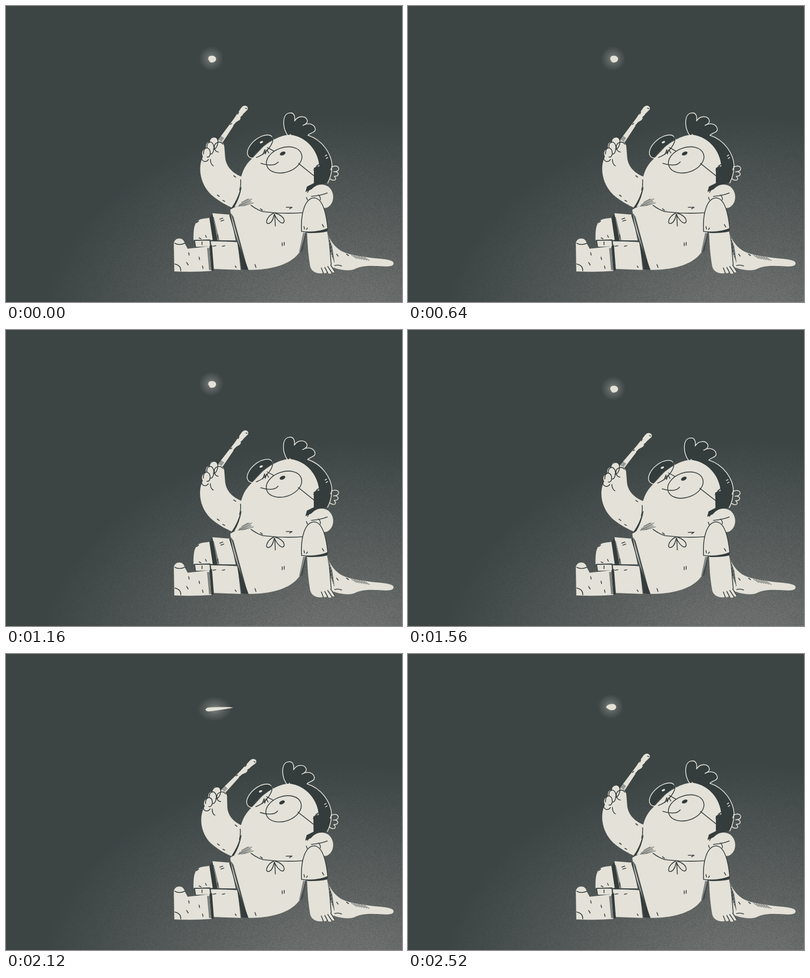
Write an HTML page with a canvas that moves like this. It is 800 by 600 pixels and loops after 2.56 s.

```html
<!DOCTYPE html>
<html lang="en">
<head>
<meta charset="utf-8">
<title>Night wand</title>
<style>
  html, body { margin: 0; width: 100%; height: 100%; overflow: hidden; background: #3c4444; }
  canvas, svg { position: absolute; left: 0; top: 0; width: 800px; height: 600px; }
  path, ellipse { stroke-linecap: round; stroke-linejoin: round; }
  .paper { fill: #e3e1d8; }
  .ink { fill: #343c3c; }
  .line { fill: none; stroke: #343c3c; stroke-width: 1.6; }
  .chalk { fill: none; stroke: #e3e1d8; stroke-width: 1.6; }
  .edged { fill: #e3e1d8; stroke: #343c3c; stroke-width: 1.6; }
  .hatch { fill: none; stroke: #343c3c; stroke-width: .9; }
</style>
</head>
<body>
<canvas id="ground" width="800" height="600"></canvas>
<svg viewBox="0 0 800 600">
  <defs>
    <radialGradient id="halo">
      <stop offset="0" stop-color="#e3e1d8" stop-opacity=".42"/>
      <stop offset=".45" stop-color="#e3e1d8" stop-opacity=".19"/>
      <stop offset="1" stop-color="#e3e1d8" stop-opacity="0"/>
    </radialGradient>
  </defs>

  <ellipse id="glow" rx="25" ry="25" fill="url(#halo)"/>
  <path id="spark" class="paper"/>

  <g id="cape">
    <path class="paper" d="M646 452C655 480 669 495 688 501C705 507 722 508 742 511C762 513 784 514 783 522C782 531 760 527 745 527C728 526 715 528 705 533C695 538 675 536 655 528Z"/>
    <path class="line" d="M664 526Q672 524 678 527M688 503L692 506M668 503L671 507"/>
  </g>

  <g id="arm">
    <g id="wand">
      <path class="paper" d="M428 272L460 229L474 208Q478 201 484 202Q490 204 488 210L479 219L472 231L464 236L438 276Z"/>
      <path class="line" d="M484 207L486 208M468 219L470 215M453 240L456 238M460 242L463 239M474 226L477 223"/>
    </g>
    <path class="paper" d="M398 305C388 324 390 358 414 382C430 396 444 403 457 409L477 385L476 346C460 340 446 328 443 309L441 284C439 275 431 271 427 272C425 262 411 263 411 275C403 277 404 283 404 289C397 290 394 299 398 305Z"/>
    <path class="line" d="M411 277C410 264 427 262 428 272C429 281 424 291 419 290M406 288C405 275 414 272 419 281C422 290 418 301 413 300M399 300C399 288 405 284 411 291C415 300 411 308 406 306M395 307C396 316 404 318 409 311M421 287C420 277 432 272 438 280M421 287Q422 295 429 296M413 311C413 318 416 323 419 324M460 344L464 347M427 383L431 386M438 394L442 396"/>
  </g>

  <g id="legs">
    <path class="paper" d="M379 475C378 446 382 433 399 431L414 429L420 476Z"/>
    <path class="edged" d="M381 475L412 474L413 488L383 489Z"/>
    <path class="ink" d="M411 430L417 421L431 476L418 477Z"/>
    <path class="paper" d="M417 420L453 423L464 475L427 475Z"/>
    <path class="paper" d="M340 538L339 481C341 468 359 468 361 481L367 492L411 487L416 537Q378 540 340 538Z"/>
    <path class="paper" d="M414 477L468 478L474 535L418 533Z"/>
    <path class="ink" d="M411 487L416 484L420 535L415 537Z"/>
    <path class="line" d="M381 475Q424 474 468 478M341 481Q350 486 361 481M341 523Q354 526 353 537M385 439L389 436M390 470L394 472M403 465L405 469M396 478L396 484M369 500L370 505M365 520L368 525M390 509L391 514M397 527L398 532M432 432L438 430M434 436L440 434M418 487L424 486M437 487L442 486M463 527L465 530M428 464L428 470"/>
  </g>

  <g id="body">
    <path class="ink" d="M451 424L456 420L490 535L476 534L467 478Z"/>
    <path class="paper" d="M453 413C462 407 472 404 486 400L600 404L612 430L605 460L595 496C580 521 544 535 490 535C481 510 459 460 453 413Z"/>
    <path class="line" d="M558 480V486M562 479V485M503 524L505 530M519 412L522 414"/>
  </g>

  <g id="near">
    <path class="paper" d="M608 455L648 453C653 480 655 504 657 524L664 537Q664 542 657 539L657 542Q653 544 648 540Q646 543 641 541C626 545 615 536 614 525C610 500 609 480 608 455Z"/>
    <path class="line" d="M654 482C655 504 656 514 657 524M644 530L650 541M650 528L658 540M637 531L641 541M656 525L664 538"/>
    <path class="ink" d="M608 457L650 452L649 457Q630 461 609 460Z"/>
  </g>

  <g id="head">
    <path class="ink" d="M569 262C558 246 558 219 572 217C580 215 585 221 583 233C590 222 604 222 608 230C611 236 605 240 600 242C612 235 624 240 625 250C625 257 614 257 610 262C640 272 658 300 659 325L653 350L646 360L614 364L600 330Z"/>
    <path class="chalk" d="M569 262C558 246 558 219 572 217C580 215 585 221 583 233M583 233C590 222 604 222 608 230C611 236 605 240 600 242C612 235 624 240 625 250C625 257 614 257 610 262C640 272 658 300 659 325M656 332C658 321 674 323 672 331C671 335 666 336 662 336C673 334 675 346 663 345C670 351 664 357 654 350M658 325Q659 341 650 359M645 304L648 302M647 309L650 307M574 260L576 263"/>
    <path class="paper" d="M474 352C479 326 490 316 502 304L519 286C535 273 555 261 575 261C610 266 631 296 633 325L622 328L622 361L609 366L606 374L619 371L612 398L600 421C565 423 520 418 494 404L470 405C459 409 458 406 463 400C473 384 474 370 474 352Z"/>
    <path class="ink" d="M489 304C485 288 506 264 528 262C539 261 542 264 539 269C526 279 514 284 498 307Q492 308 489 304Z"/>
    <ellipse class="chalk" cx="514" cy="285" rx="31" ry="17" transform="rotate(-39 514 285)"/>
    <path class="line" d="M538 263C544 275 528 299 506 307"/>
    <ellipse class="paper" cx="516" cy="276" rx="3.5" ry="2" transform="rotate(-25 516 276)"/>
    <path class="line" d="M519 301L523 291L524 300L527 291L531 298M528 287L541 294M515 319C524 322 543 326 550 316M591 319L622 344M474 352Q475 364 472 373M566 408H578L573 411M607 388L609 393"/>
    <ellipse class="line" cx="562" cy="312" rx="37" ry="25" transform="rotate(-19 562 312)"/>
    <ellipse class="ink" cx="559" cy="299" rx="6" ry="3.5" transform="rotate(-24 559 299)"/>
    <path class="ink" d="M605 377L608 366L622 359L626 364L616 372Z"/>
  </g>

  <g id="front">
    <path class="line" d="M495 404Q508 414 520 417Q560 422 602 419M541 420C530 424 522 439 529 441C537 441 540 431 542 422C550 438 560 445 562 436C562 428 552 422 544 420M543 422L544 446M514 411L518 414"/>
    <path class="ink" d="M474 368Q469 390 455 410L461 408Q472 390 476 367Z"/>
    <path class="hatch" d="M469 406L497 391M471 406L494 395M475 406L496 397M471 403L492 391M480 405L500 399M476 398L489 391"/>
    <path class="paper" d="M614 378C619 364 637 357 651 366C665 377 664 400 650 408Q642 412 635 406L610 414Z"/>
    <path class="line" d="M609 378C613 370 619 365 626 364M617 386Q637 384 649 379M631 383Q636 387 635 393"/>
    <path class="edged" d="M597 457C595 420 604 390 622 389C640 389 647 421 650 451C634 458 614 459 597 457Z"/>
    <path class="line" d="M602 447L603 452M639 443L642 448M607 453L609 450"/>
  </g>
</svg>

<script>
const LOOP = 2560, STEP = 40, BOB = 640;
const $ = id => document.getElementById(id);
const set = (id, value, name = 'transform') => $(id).setAttribute(name, value);

function paintGround() {
  const ctx = $('ground').getContext('2d');
  const image = ctx.createImageData(800, 600);
  let seed = 7;
  const random = () => (seed = (seed * 16807) % 2147483647) / 2147483647;
  for (let y = 0, i = 0; y < 600; y++) {
    for (let x = 0; x < 800; x++, i += 4) {
      const light = Math.min(1, Math.max(0, 1.3 * (1 - Math.hypot((x - 680) / 620, (y - 690) / 470))));
      const weave = Math.sin(x * 1.7 + y * .45) * Math.sin(y * 1.9 - x * .3);
      const v = light * 46 + Math.sqrt(light) * (weave * 11 + (random() - .5) * 24);
      image.data.set([60 + v, 68 + v * .9, 68 + v * .86, 255], i);
    }
  }
  ctx.putImageData(image, 0, 0);
}

// n strokes from (x1,y1) to (x2,y2), each shifted by (dx,dy)
function hatch(id, x1, y1, x2, y2, dx, dy, n) {
  const path = document.createElementNS('http://www.w3.org/2000/svg', 'path');
  let d = '';
  for (let i = 0; i < n; i++) d += `M${x1 + i * dx} ${y1 + i * dy}L${x2 + i * dx} ${y2 + i * dy}`;
  path.setAttribute('d', d);
  path.setAttribute('class', 'hatch');
  $(id).append(path);
}

// Smooth steps between [time, value] keys
function ease(keys, t) {
  if (t <= keys[0][0]) return keys[0][1];
  for (let i = 1; i < keys.length; i++) {
    const [a, from] = keys[i - 1], [b, to] = keys[i];
    if (t <= b) {
      const u = (t - a) / (b - a);
      return from + (to - from) * u * u * (3 - 2 * u);
    }
  }
  return keys[keys.length - 1][1];
}

const dash = t => ease([[1700, 0], [2020, 60], [2215, -66], [2280, -68], [2560, 0]], t);
const flick = t => ease([[1680, 0], [2080, 1], [2120, 1], [2240, -.5], [2480, 0]], t);
const lift = t => ease([[1800, 0], [2120, -5], [2400, 0]], t);

function drawSpark(t, bob) {
  const x = 416.5 + dash(t), y = 107.5 + 12.5 * bob + lift(t);
  const speed = dash(t) - dash(t - STEP);
  const side = speed < 0 ? -1 : 1;
  const tail = Math.max(8, Math.abs(speed) * 1.3);
  const r = 6.8 / (1 + (tail - 8) / 60);
  set('spark', `M${-tail} 0C${-tail * .92} ${-r * .7} ${-r} ${-r} 0 ${-r}A8 ${r} 0 0 1 0 ${r}C${-r} ${r} ${-tail * .6} ${r * .6} ${-tail} 0Z`, 'd');
  set('spark', `translate(${x} ${y}) scale(${side} 1) rotate(${side < 0 ? 4 : -4})`);
  set('glow', `translate(${x - 2 - side * (tail - 8) * .3} ${y - 1}) scale(${1 + (tail - 8) / 100} 1)`);
}

function draw(now) {
  const t = Math.floor(now % LOOP / STEP) * STEP;
  const bob = (1 - Math.cos((t + 20) / BOB * 2 * Math.PI)) / 2;
  const f = flick(t);
  drawSpark(t, bob);
  set('head', `translate(0 ${1.5 * bob}) rotate(${-.85 * bob} 620 420)`);
  set('arm', `translate(460 ${400 + 1.5 * f}) matrix(${1 + .025 * bob} 0 ${-.05 * f} ${1 - .022 * bob} 0 0) translate(-460 -400)`);
  set('wand', `rotate(${2.9 * bob + 4 * f} 430 276)`);
  requestAnimationFrame(draw);
}

paintGround();
hatch('wand', 431, 262, 440, 268, -1, 1.5, 6);
hatch('cape', 649, 460, 654, 494, 1.8, 5, 6);
hatch('cape', 698, 505, 709, 512, 5, .8, 6);
hatch('legs', 416, 428, 427, 474, 1.6, 0, 3);
hatch('legs', 407, 491, 411, 535, 1.6, 0, 3);
hatch('body', 455, 421, 483, 524, 1.3, 2, 4);
hatch('body', 601, 460, 593, 498, 1.7, 0, 4);
hatch('head', 634, 319, 627, 329, -1.5, 1, 5);
requestAnimationFrame(draw);
</script>
</body>
</html>
```
